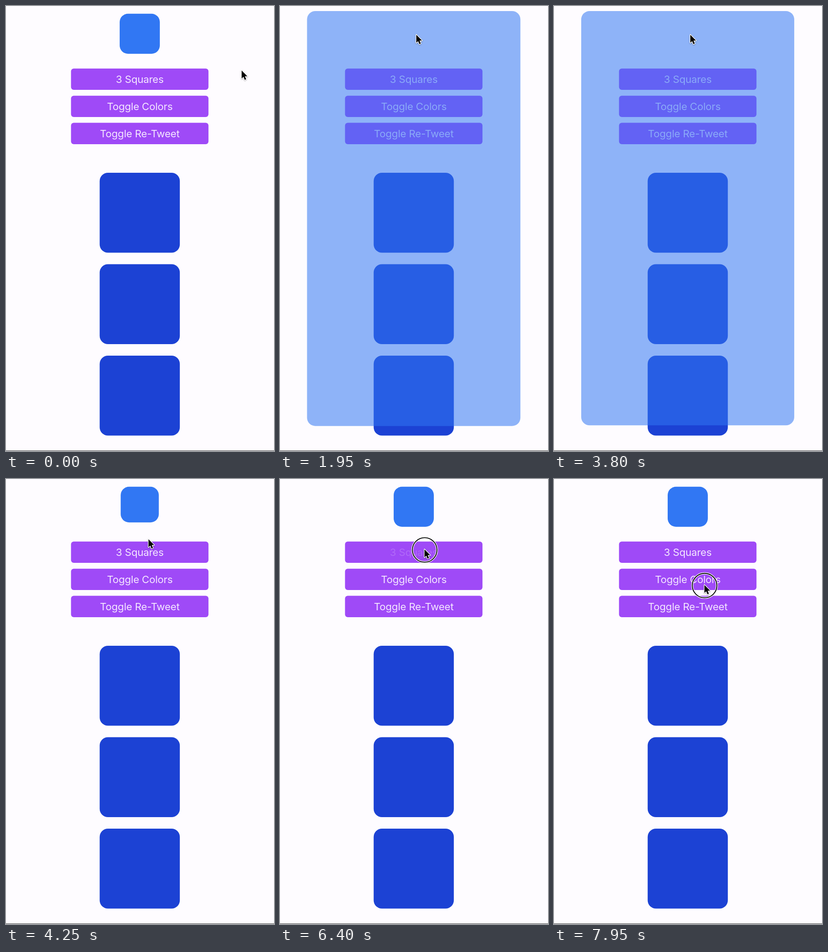
An HTML page with a canvas that plays this animation: 580 px wide and 966 px high, repeating every 8000 ms.

```html
<!DOCTYPE html>
<html lang="en">
<head>
<meta charset="utf-8">
<title>Motion demo</title>
<style>
  html, body { margin: 0; width: 100%; height: 100%; overflow: hidden; background: #fefcff; }
  canvas { display: block; width: 580px; height: 966px; }
</style>
</head>
<body>
<canvas id="stage" width="580" height="966"></canvas>
<script>
const ctx = document.getElementById('stage').getContext('2d');
const LOOP = 8000, STEP = 50;

const labels = ['3 Squares', 'Toggle Colors', 'Toggle Re-Tweet'];

// Mouse presses: what is hit, when it goes down and when it is released.
const presses = [
  { on: 'box', down: 840, up: 1370 },
  { on: 'box', down: 1990, up: 2190 },
  { on: 'box', down: 2690, up: 3070 },
  { on: 'box', down: 3820, up: 4000 },
  { on: 0, down: 4380, up: 4660 },
  { on: 0, down: 5200, up: 5600 },
  { on: 0, down: 6200, up: 6760 },
  { on: 0, down: 7290, up: 7540 },
  { on: 1, down: 7940, up: 8200 }
];

// Pointer moves: start, end, target.
const home = [510, 140];
const moves = [
  [30, 800, 295, 62.5],
  [4060, 4340, 312.7, 152.7],
  [7600, 7900, 325.5, 230]
];

const clamp = v => Math.min(1, Math.max(0, v));
const mix = (a, b, p) => a + (b - a) * p;
const smooth = p => { p = clamp(p); return p * p * (3 - 2 * p); };

// Step response of an underdamped spring.
const ZETA = 0.67, PEAK = 330;
function spring(ms) {
  if (ms <= 0) return 0;
  const wd = Math.PI / PEAK, decay = wd * ZETA / Math.sqrt(1 - ZETA * ZETA);
  return 1 - Math.exp(-decay * ms) * (Math.cos(wd * ms) + decay / wd * Math.sin(wd * ms));
}
const timing = ms => smooth(ms / 300);

// Adds up alternating on/off responses for all presses on one target.
function toggled(target, t, response) {
  return presses.filter(p => p.on === target)
    .reduce((sum, p, i) => sum + (i % 2 ? -1 : 1) * response(t - p.up), 0);
}

function labelAlpha(index, t) {
  let alpha = 1;
  for (const p of presses) {
    if (p.on !== index || t < p.down) continue;
    const dim = smooth((Math.min(t, p.up) - p.down) / 150);
    const back = smooth((t - p.up) / 250);
    alpha = Math.min(alpha, 1 - 0.8 * dim * (1 - back));
  }
  return alpha;
}

function pointer(t) {
  return moves.reduce(([x, y], [a, b, tx, ty]) => {
    const p = smooth((t - a) / (b - a));
    return [mix(x, tx, p), mix(y, ty, p)];
  }, home);
}

function slab(left, top, right, bottom, radius, color) {
  ctx.fillStyle = color;
  ctx.beginPath();
  ctx.roundRect(left, top, right - left, bottom - top, radius);
  ctx.fill();
}

function drawButtons(t) {
  ctx.font = '400 22px Inter, sans-serif';
  ctx.letterSpacing = '-0.2px';
  ctx.textAlign = 'center';
  labels.forEach((label, i) => {
    const top = 135.8 + i * 58.9;
    slab(140.7, top, 438.2, top + 46.3, 6, '#9f4af7');
    ctx.globalAlpha = labelAlpha(i, t);
    ctx.fillStyle = '#f4e7ff';
    ctx.fillText(label, 289.5, top + 31.6);
    ctx.globalAlpha = 1;
  });
}

function drawSquares(t) {
  const wide = toggled(0, t, timing);
  for (let i = 0; i < 3; i++) {
    const top = 362 + i * 198.5;
    slab(mix(202.7, 23.5, wide), top, mix(376.2, 555.2, wide), top + 173.6, 18, '#1c42d4');
  }
}

function drawBox(t) {
  const open = toggled('box', t, spring);
  ctx.globalAlpha = clamp(mix(1, 0.54, open));
  slab(mix(246, 58.4, open), mix(16.8, 11, open),
       mix(332.9, 520.4, open), mix(103.7, 912.3, open), 18, '#3177f3');
  ctx.globalAlpha = 1;
}

function drawPointer(t) {
  const [x, y] = pointer(t);
  ctx.save();
  ctx.translate(x, y);

  if (presses.some(p => t >= p.down && t < p.up)) {
    ctx.beginPath();
    ctx.arc(0.4, 1.3, 26.6, 0, 2 * Math.PI);
    for (const [color, width] of [['#fff', 4.4], ['#000', 1.9]]) {
      ctx.strokeStyle = color;
      ctx.lineWidth = width;
      ctx.stroke();
    }
  }

  const arrow = new Path2D('M0 0V17.3L3.9 13.7L6.7 20.2L9.7 18.9L7 12.6H12.3Z');
  ctx.lineJoin = 'round';
  ctx.shadowColor = 'rgba(0,0,0,.35)';
  ctx.shadowBlur = 2.5;
  ctx.shadowOffsetY = 1;
  ctx.strokeStyle = '#fff';
  ctx.lineWidth = 2.6;
  ctx.stroke(arrow);
  ctx.shadowColor = 'transparent';
  ctx.fillStyle = '#000';
  ctx.fill(arrow);
  ctx.restore();
}

function draw(t) {
  ctx.fillStyle = '#fefcff';
  ctx.fillRect(0, 0, 580, 966);
  drawButtons(t);
  drawSquares(t);
  drawBox(t);
  ctx.fillStyle = '#5c5b5d';
  ctx.fillRect(0, 964.8, 580, 1.2);
  drawPointer(t);
}

const start = performance.now();
function tick() {
  const t = (performance.now() - start) % LOOP;
  draw(Math.floor(t / STEP) * STEP);
  requestAnimationFrame(tick);
}
tick();
</script>
</body>
</html>
```
